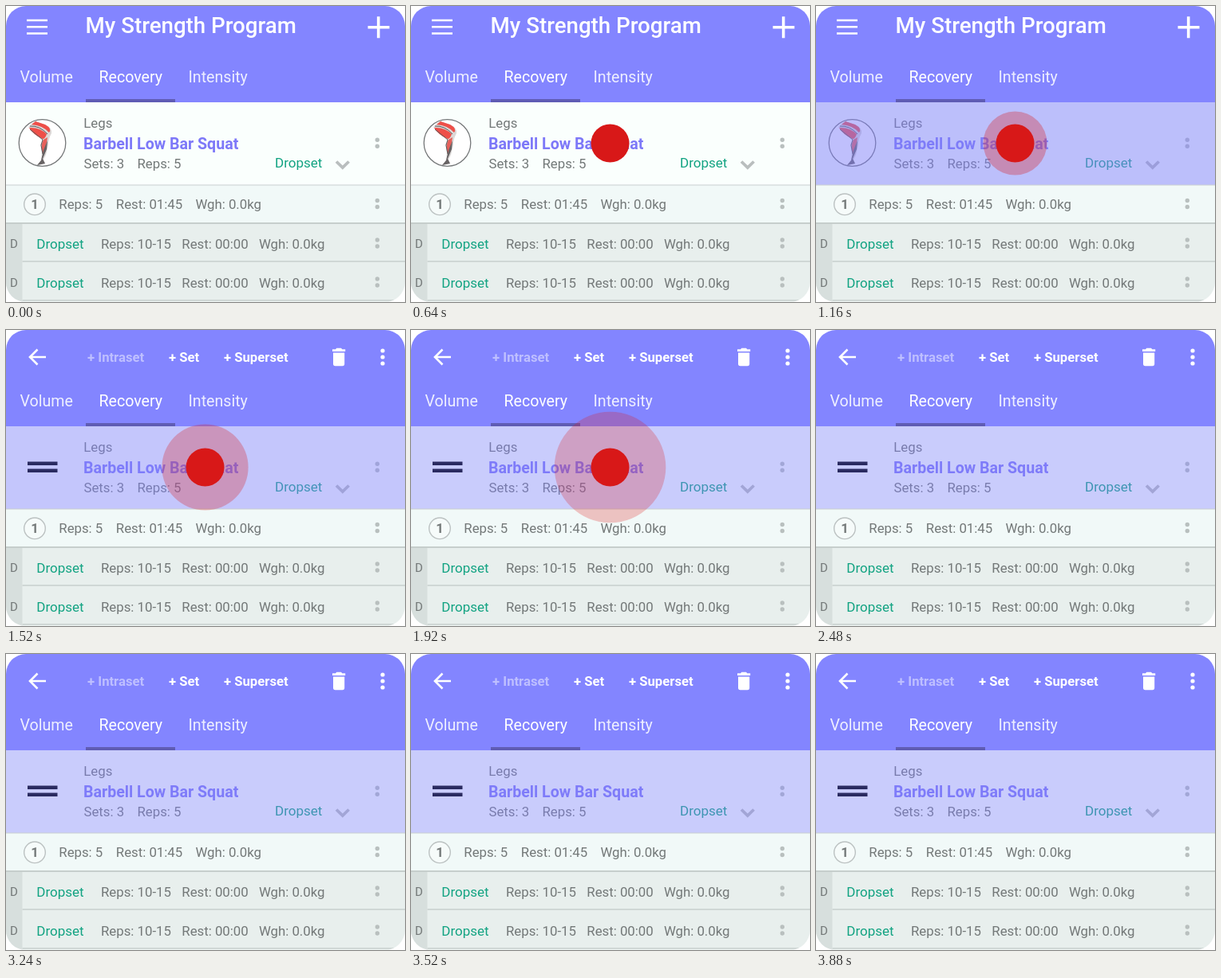
Recreate the animation shown at these times as an HTML page. Size 500 by 372 pixels, loop 3.92 s.

```html
<!DOCTYPE html>
<html>
<head>
<meta charset="utf-8">
<style>
html, body { margin: 0; width: 100%; height: 100%; overflow: hidden; background: #fff; }
svg { display: block; width: 500px; height: 372px; }
text { font-family: Roboto, sans-serif; font-size: 16.8px; fill: #737878; white-space: pre; }
.tab { font-size: 19.6px; fill: #eeefff; }
.on, .title, .act { fill: #fff; }
.title { font-size: 27.7px; font-weight: 500; }
.act { font-size: 16.7px; font-weight: 700; }
.name { font-size: 19.6px; font-weight: 700; fill: #7d78f8; }
.drop { fill: #12a382; font-size: 17px; }
.side { font-size: 15px; }
.num { font-weight: 700; fill: #747979; text-anchor: middle; }
</style>
</head>
<body>
<svg viewBox="0 0 500 372">
  <defs><clipPath id="card"><rect width="500" height="372" rx="25"/></clipPath></defs>
  <g clip-path="url(#card)">
    <rect width="500" height="122" fill="#8385ff"/>
    <g id="normal" fill="none" stroke="#fff">
      <path d="M26 18H52M26 26.2H52M26 34.5H52" stroke-width="2.6"/>
      <path d="M453.5 26.7H480.5M466.7 13.2V40.2" stroke-width="3.6"/>
      <text class="title" x="99.6" y="34" stroke="none">My Strength Program</text>
    </g>
    <g id="edit" fill="#fff">
      <path d="M50 34H30.5M39.5 24.5L30 34L39.5 43.5" fill="none" stroke="#fff" stroke-width="2.6"/>
      <text class="act" x="102" y="40" opacity=".48">+ Intraset</text>
      <text class="act" x="204" y="40">+ Set</text>
      <text class="act" x="273" y="40">+ Superset</text>
      <path d="M409 24.2H413L414.3 22.8H420L421.3 24.2H425.2V27H409ZM410 28.5H424.2V42.6Q424.2 45.2 421.6 45.2H412.6Q410 45.2 410 42.6Z"/>
      <circle cx="472" cy="26" r="2.6"/><circle cx="472" cy="34" r="2.6"/><circle cx="472" cy="42" r="2.6"/>
    </g>
    <text class="tab" x="17.5" y="95.5">Volume</text>
    <text class="tab on" x="116.5" y="95.5">Recovery</text>
    <text class="tab" x="228.5" y="95.5">Intensity</text>

    <rect y="121" width="500" height="104" fill="#fafffd"/>
    <rect x="100" y="117" width="112" height="4" fill="#5f5cb4"/>
    <g id="leg">
      <circle cx="45.5" cy="172" r="29.3" fill="#fff" stroke="#747778" stroke-width="1.3"/>
      <path d="M28 152L36 145L49 149Q58 153 57 160Q53 167 53 174L50 187L47 193L49 198L39 200L44 194L45 184L43 174L46 168L36 161Z" fill="#dcd8d7"/>
      <path d="M32 149L37 145L49 149Q58 154 54 159Q46 150 32 149ZM29 153Q42 152 51 161Q49 167 46 167Q34 162 29 153Z" fill="#ee4f49"/>
      <path d="M47 168L52 165L50 178L46 186Q43 175 47 168Z" fill="#e6605a"/>
      <path d="M52 169L51 180L46 192L49 198L39 200L44 194L47 181Z" fill="#676364"/>
      <path d="M30 151Q42 150 52 161M30 155L46 168L44 175L46 186" fill="none" stroke="#5a5657" stroke-width="1"/>
    </g>
    <text x="97.3" y="153">Legs</text>
    <text class="name" x="97" y="179.5">Barbell Low Bar Squat</text>
    <text x="97.5" y="204">Sets: 3</text>
    <text x="164.5" y="204">Reps: 5</text>
    <text class="drop" x="337" y="202.5">Dropset</text>
    <path d="M414 195.5L421.8 203L429.6 195.5" fill="none" stroke="#b9bebe" stroke-width="3.8"/>
    <g id="topDots"></g>
    <rect id="tint" y="121" width="500" height="104" fill="#8080fa"/>
    <path id="handle" d="M27 167.8H64.5M27 176.8H64.5" stroke="#2a2b60" stroke-width="4.6"/>
    <g id="rows"></g>
    <circle id="ripple" cx="249.5" cy="172.5" fill="#d81818"/>
    <circle id="dot" cx="249.5" cy="172.5" fill="#d81818"/>
  </g>
</svg>
<script>
const LOOP = 3920;
const $ = id => document.getElementById(id);
const clamp = v => Math.max(0, Math.min(1, v));
const ramp = (t, a, b) => clamp((t - a) / (b - a));
const smooth = p => p * p * (3 - 2 * p);
const text = (x, y, s, c = '') => `<text x="${x}" y="${y}" class="${c}">${s}</text>`;
const rect = (x, y, w, h, fill) => `<rect x="${x}" y="${y}" width="${w}" height="${h}" fill="${fill}"/>`;
const dots = y => [-4, 4].map(d => `<circle cx="465.3" cy="${y + d}" r="2.7" fill="#b9c0bf"/>`).join('');

function dropRow(y) {
  const base = y + 32;
  return rect(0, y, 500, 50, '#e8efed') + rect(0, y, 20.5, 50, '#d7dfdd') +
    rect(20.5, y + 47, 480, 2, '#cfd7d5') + rect(20.5, y + 49, 480, 1, '#f0f6f4') +
    text(5, base - 1, 'D', 'side') + text(38.3, base, 'Dropset', 'drop') +
    text(119, base, 'Reps: 10-15') + text(220.3, base, 'Rest: 00:00') +
    text(316.9, base, 'Wgh: 0.0kg') + dots(y + 25);
}

$('topDots').innerHTML = dots(172.3);
$('rows').innerHTML =
  rect(0, 225, 500, 48, '#f1f9f8') + rect(0, 224.5, 500, 1, '#c9cfd2') +
  '<circle cx="36" cy="249.3" r="13.3" fill="#f6fbfa" stroke="#bcc2c2" stroke-width="1.4"/>' +
  text(36, 255.3, '1', 'num') + text(66.3, 255.3, 'Reps: 5') +
  text(137.8, 255.3, 'Rest: 01:45') + text(237.4, 255.3, 'Wgh: 0.0kg') + dots(248.5) +
  dropRow(273) + dropRow(322) + rect(0, 272, 500, 2, '#c6cecc');

function draw(t) {
  const edit = t >= 1400;
  $('normal').style.display = $('leg').style.display = edit ? 'none' : '';
  $('edit').style.display = $('handle').style.display = edit ? '' : 'none';
  // press highlight peaks, then settles to the selected shade
  $('tint').setAttribute('opacity', .5 * smooth(ramp(t, 780, 1080)) - .1 * ramp(t, 1200, 1800));

  const size = smooth(ramp(t, 440, 600)) * (1 - smooth(ramp(t, 2080, 2240)));
  $('dot').setAttribute('r', 24 * size);
  const grow = ramp(t, 760, 2160);
  $('ripple').setAttribute('r', 24.2 + 55 * grow);
  $('ripple').setAttribute('opacity', t < 760 ? 0 : (.34 - .11 * grow) * (1 - ramp(t, 2000, 2200)));
}

const start = performance.now();
function tick() {
  draw((performance.now() - start) % LOOP);
  requestAnimationFrame(tick);
}
draw(0);
tick();
</script>
</body>
</html>
```
